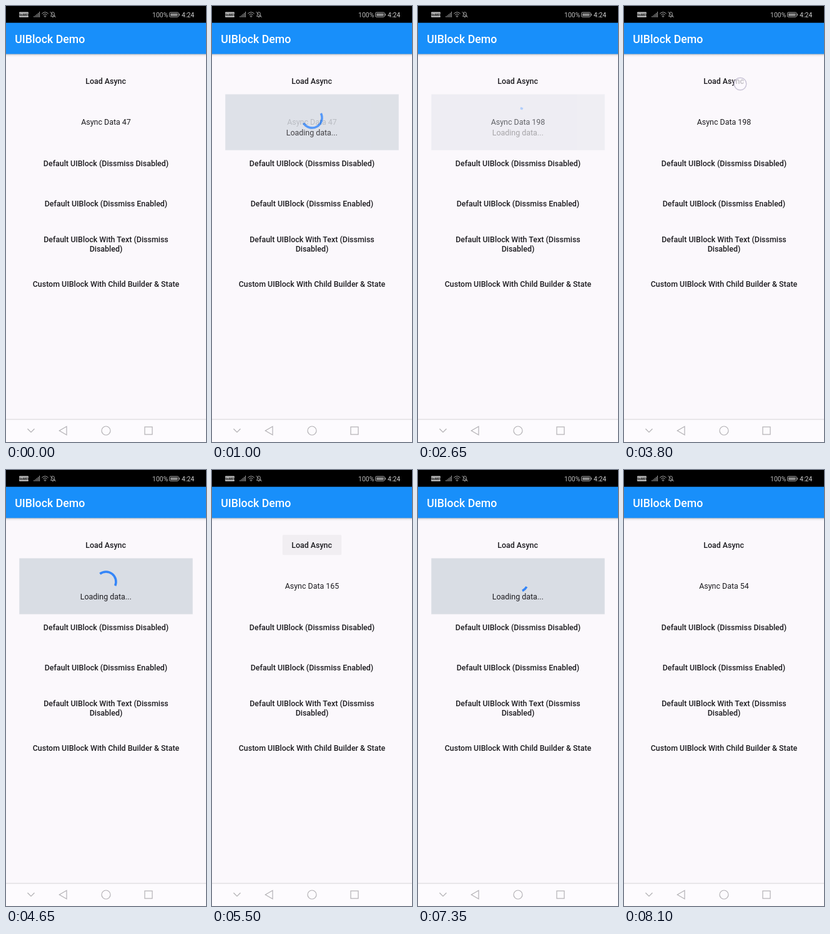
Recreate the animation shown at these times as an HTML page. Size 320 by 694 pixels, loop 8500 ms.

```html
<!DOCTYPE html>
<html lang="en">
<head>
<meta charset="utf-8">
<title>UIBlock Demo</title>
<style>
  html, body { margin: 0; width: 100%; height: 100%; overflow: hidden; background: #fbf8fc; }
  svg { display: block; width: 100%; height: 100%; }
  text { font-family: Roboto, Arial, sans-serif; font-size: 12.44px; fill: #1d1c20; }
  .label { font-weight: 500; }
  .mid { text-anchor: middle; }
  .status { font-size: 10.5px; fill: #b9b9b9; }
  .nav { fill: none; stroke: #b3b1b5; stroke-width: 1.2; }
  .icon { fill: none; stroke: #a8a8a8; stroke-width: 1; }
</style>
</head>
<body>
<svg viewBox="0 0 320 694">
  <defs>
    <linearGradient id="shade" x2="0" y2="1">
      <stop offset="0" stop-color="#000" stop-opacity=".3"/>
      <stop offset=".4" stop-color="#000" stop-opacity=".08"/>
      <stop offset="1" stop-color="#000" stop-opacity="0"/>
    </linearGradient>
    <clipPath id="buttonClip"><rect x="112.8" y="103.2" width="94.4" height="32" rx="1.8"/></clipPath>
  </defs>

  <rect width="320" height="694" fill="#fbf8fc"/>
  <rect y="76" width="320" height="5" fill="url(#shade)"/>
  <rect y="26" width="320" height="50.4" fill="#188ffa"/>
  <rect width="320" height="26.7" fill="#000"/>
  <text class="label" x="14.2" y="58.5" style="font-size:17.78px;fill:#fff">UIBlock Demo</text>

  <!-- status bar -->
  <rect x="21" y="9.5" width="15" height="8.5" rx="1" fill="#b4b4b4"/>
  <text class="mid" x="28.5" y="15.7" style="font-size:4.8px;font-weight:700;fill:#111">VoWiFi</text>
  <path d="M45 18V16M47.2 18V14.5M49.4 18V12.8M51.6 18V11M53.6 18V9" class="icon" stroke-width="1.3"/>
  <path d="M57.3 12.3Q62.5 7.3 67.7 12.3M59.2 14.3Q62.5 11.2 65.8 14.3M61 16.2Q62.5 15 64 16.2L62.5 17.8Z" class="icon"/>
  <path d="M71.5 16.3H78.5L77.4 14.6V12.3Q77.2 9.8 75 9.8Q72.7 9.8 72.6 12.3V14.6ZM74 17.8H76M70.6 9.2L79.4 18.2" class="icon"/>
  <text class="status" x="234" y="17.6">100%</text>
  <rect x="261.5" y="10.2" width="14.5" height="7.2" rx="1.6" class="icon"/>
  <rect x="263" y="11.7" width="11.5" height="4.2" rx=".6" fill="#8d8d8d"/>
  <path d="M277.5 12.3V15.3" class="icon"/>
  <text class="status" x="281" y="17.6" style="fill:#d0d0d0">4:24</text>

  <!-- page -->
  <g clip-path="url(#buttonClip)">
    <rect id="highlight" x="112" y="103" width="96" height="33" fill="#bcbcbc"/>
    <circle id="splash" cx="186" cy="124" fill="#c8c8c8"/>
  </g>
  <g class="label mid">
    <text x="159.6" y="123.6">Load Async</text>
    <text x="160" y="255.3">Default UIBlock (Dissmiss Disabled)</text>
    <text x="160" y="319.3">Default UIBlock (Dissmiss Enabled)</text>
    <text x="160" y="376.3">Default UIBlock With Text (Dissmiss</text>
    <text x="160" y="390.5">Disabled)</text>
    <text x="160" y="447.3">Custom UIBlock With Child Builder &amp; State</text>
  </g>
  <text id="data" class="mid" x="160" y="189.4"></text>
  <g id="panel">
    <rect x="21.3" y="140.5" width="277.4" height="89" fill="#d9dde4"/>
    <path id="arc" fill="none" stroke="#3586f8" stroke-width="3.56"/>
    <text class="mid" x="159.7" y="205.5">Loading data...</text>
  </g>
  <circle id="touch" cx="186" cy="124" r="9.8" fill="#fcfaff" fill-opacity=".72" stroke="#c9c4d6" stroke-width="1.4"/>

  <!-- navigation bar -->
  <rect y="658" width="320" height="36" fill="#fdfbfe"/>
  <rect y="657.5" width="320" height="1" fill="#d6d4d8"/>
  <g class="nav">
    <path d="M34.5 673L40 678.5L45.5 673"/>
    <path d="M97 669.3V682.7L85.3 676Z"/>
    <circle cx="160" cy="676" r="7"/>
    <rect x="222" y="670" width="12" height="12"/>
  </g>
</svg>
<script>
const LOOP = 8500;
const HOLD = { from: 5500, to: 6400 };
// press: button goes down; block: overlay opens; done: data arrives
const runs = [
  { press: 650, block: 793, done: 2450, value: 198, touch: true },
  { press: 3800, block: 3987, done: 5150, value: 165, touch: true },
  { press: 6320, block: 6553, done: 7750, value: 54, touch: false },
];
const FIRST_VALUE = 47;

const el = id => document.getElementById(id);
const [highlight, splash, data, panel, arc, touch] =
  ['highlight', 'splash', 'data', 'panel', 'arc', 'touch'].map(el);
const clamp = v => Math.min(1, Math.max(0, v));
const ramp = (t, start, length) => clamp((t - start) / length);

// cubic-bezier(.4, 0, .2, 1), solved by bisection
function fastOutSlowIn(x) {
  let lo = 0, hi = 1;
  for (let i = 0; i < 22; i++) {
    const s = (lo + hi) / 2, r = 1 - s;
    if (1.2 * r * r * s + 0.6 * r * s * s + s ** 3 < x) lo = s; else hi = s;
  }
  return lo * lo * (3 - 2 * lo);
}

function arcPath(elapsed) {
  const turns = Math.max(0, elapsed) / 1000;
  const step = Math.floor(turns) % 5, phase = turns % 1;
  const head = fastOutSlowIn(clamp(phase * 2));
  const tail = fastOutSlowIn(clamp(phase * 2 - 1));
  const start = -90 + 270 * tail + 306 * phase - 144 * step;
  const sweep = Math.max(270 * (head - tail), 0.1);
  const point = deg => {
    const a = deg * Math.PI / 180;
    return `${160 + 16 * Math.cos(a)} ${178 + 16 * Math.sin(a)}`;
  };
  return `M${point(start)}A16 16 0 ${sweep > 180 ? 1 : 0} 1 ${point(start + sweep)}`;
}

function render(time) {
  const held = time >= HOLD.from && time < HOLD.to;
  const t = held ? HOLD.to : time;
  const run = runs.filter(r => r.press <= t).pop() || runs[0];

  const release = 1 - ramp(t, run.block, 200);
  const pressed = Math.min(ramp(t, run.press, 200), release);
  highlight.setAttribute('opacity', 0.4 * pressed);
  const grow = ramp(t, run.press + 80, 420);
  splash.setAttribute('r', 85 * grow);
  splash.setAttribute('opacity', 0.4 * release * (grow > 0));
  const touching = run.touch && t >= run.press && t < run.block;
  touch.setAttribute('opacity', touching ? 1 : 0);

  const value = runs.reduce((v, r) => t >= r.done ? r.value : v, FIRST_VALUE);
  data.textContent = `Async Data ${value}`;
  panel.setAttribute('opacity', ramp(t, run.block, 250) * (1 - ramp(t, run.done, 320)));
  arc.setAttribute('d', arcPath(t - run.block));
}

const begin = performance.now();
function tick() {
  render((performance.now() - begin) % LOOP);
  requestAnimationFrame(tick);
}
tick();
</script>
</body>
</html>
```
